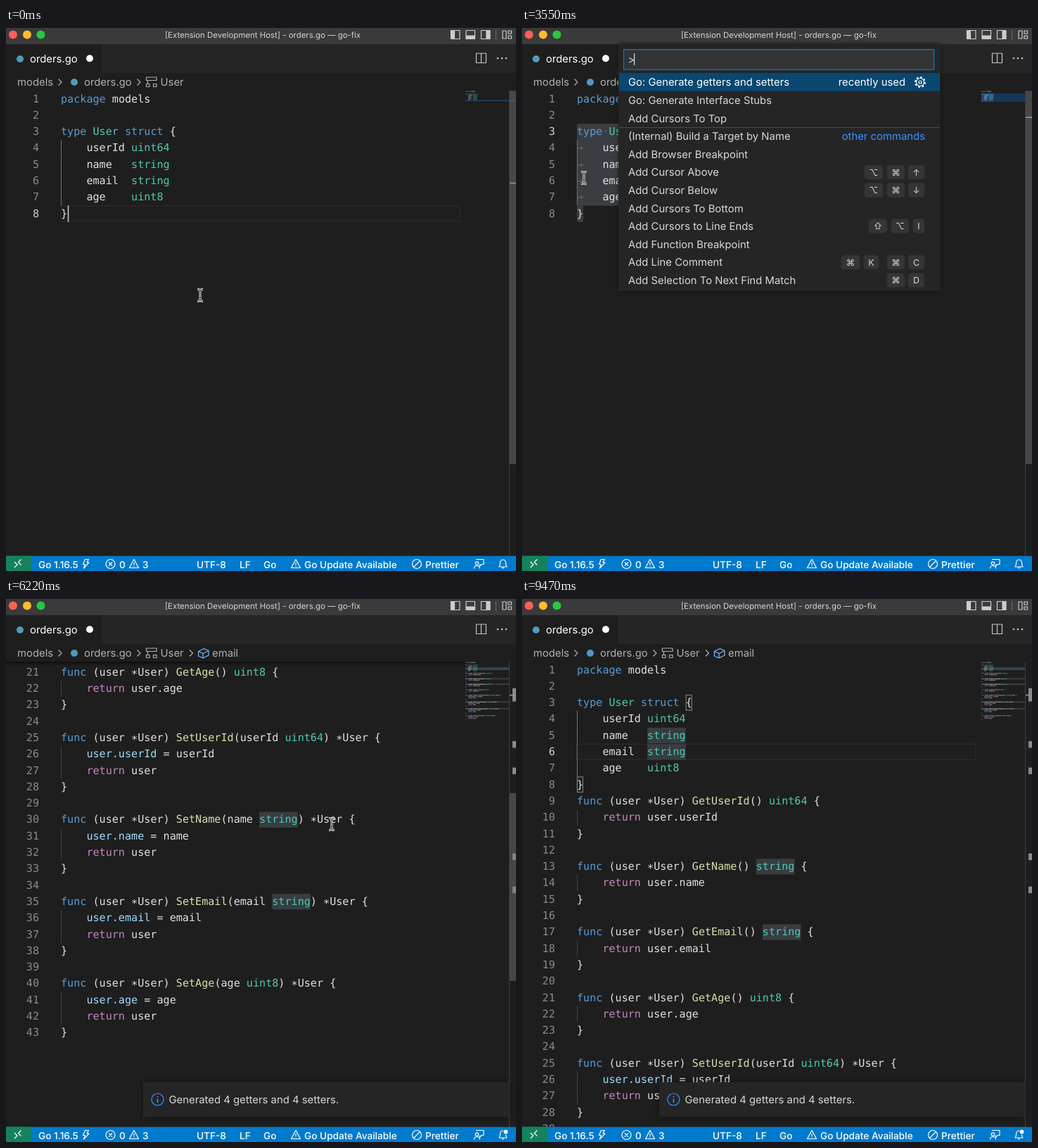
Animation, 725 px wide and 772 px high, one loop 9.57 s. Source, as an HTML page:

```html
<!DOCTYPE html>
<html lang="en">
<head>
<meta charset="utf-8">
<title>Generate getters and setters</title>
<style>
html, body { margin: 0; width: 100%; height: 100%; overflow: hidden; background: #1e1e1e; }
svg { display: block; }
text { font: 14.85px Inter, "Open Sans", sans-serif; white-space: pre; text-rendering: geometricPrecision; }
.code { font: 15.12px "DejaVu Sans Mono", monospace; }
.key { font: 12.5px Inter, "DejaVu Sans", sans-serif; }
#status text { font-size: 13.65px; font-weight: 500; fill: #fff; }
.icon { fill: none; stroke-width: 1.2; stroke-linejoin: round; }
</style>
</head>
<body>
<svg width="725" height="772" viewBox="0 0 725 772">
  <svg y="89" width="725" height="662" viewBox="0 89 725 662"><g id="editor"></g></svg>

  <rect width="725" height="23" fill="#3a3a3b"/>
  <circle cx="10" cy="9.5" r="6" fill="#ff5f57"/>
  <circle cx="30" cy="9.5" r="6" fill="#febc2e"/>
  <circle cx="49.5" cy="9.5" r="6" fill="#28c840"/>
  <text x="365" y="13.7" text-anchor="middle" fill="#d4d4d4" style="font-size:11.45px">[Extension Development Host] - orders.go — go-fix</text>
  <g class="icon" stroke="#ccc">
    <path d="M632.5 3.5h12.5v12h-12.5zM654 3.5h12.5v12h-12.5zM675.5 3.5h12.5v12h-12.5zM706 4h5v11h-5zM714 4h4.5v4h-4.5zM714 11h4.5v4h-4.5z"/>
    <path d="M633 4h4.5v11h-4.5zM654.5 11h11.5v4h-11.5zM683 4h4.5v11h-4.5z" fill="#ccc"/>
    <path d="M696.5 3v14" stroke="#666"/>
  </g>

  <rect y="23" width="725" height="41" fill="#252526"/>
  <rect y="23" width="136" height="42" fill="#1e1e1e"/>
  <rect y="64" width="725" height="25" fill="#1e1e1e"/>
  <circle cx="20" cy="44" r="5" fill="#519aba"/>
  <text x="34" y="49.2" fill="#fff">orders.go</text>
  <circle cx="119" cy="43.2" r="5" fill="#fff"/>
  <path class="icon" d="M668.5 36h14v13.5h-14zM675.5 36v13.5" stroke="#c5c5c5"/>
  <g fill="#c5c5c5"><circle cx="699" cy="43" r="1.3"/><circle cx="705" cy="43" r="1.3"/><circle cx="711" cy="43" r="1.3"/></g>
  <text x="16" y="82.3" fill="#b0b0b0">models</text>
  <circle cx="97" cy="77" r="5" fill="#519aba"/>
  <text x="111" y="82.3" fill="#b0b0b0">orders.go</text>
  <path class="icon" d="M74.5 72.5l4.500 4.500-4.500 4.500M186.5 72.5l4.500 4.500-4.500 4.500" stroke="#b0b0b0"/>

  <g id="status">
    <rect y="750.6" width="725" height="21.4" fill="#007acc"/>
    <rect y="750.6" width="37" height="21.4" fill="#16825d"/>
    <text x="46" y="767.8">Go 1.16.5</text>
    <text x="161" y="767.8">0</text>
    <text x="194" y="767.8">3</text>
    <text x="271" y="767.8">UTF-8</text>
    <text x="332" y="767.8">LF</text>
    <text x="366" y="767.8">Go</text>
    <text x="424" y="767.8">Go Update Available</text>
    <text x="596" y="767.8">Prettier</text>
    <g class="icon" stroke="#fff">
      <path d="M12 759l4 4-4 4M21.5 755.5l-4 4 4 4"/>
      <path d="M112.5 755.5h5l-2.5 4.5h3l-7.5 8 2-5.5h-3z"/>
      <circle cx="148.5" cy="762" r="6.5"/><path d="M146 759.5l5 5m0-5l-5 5"/>
      <path id="warn" d="M182 755.5l6.5 12h-13zM182 760v3.5m0 1v1.3"/>
      <use href="#warn" x="230"/>
      <circle cx="584" cy="762" r="6.5"/><path d="M579.5 766.5l9-9"/>
      <path d="M668 755.5h11v7h-3l-2.5 2.5v-2.5M665.5 768.5q0-4 4-4t4 4"/><circle cx="669.5" cy="761" r="2.2"/>
      <path d="M701 766q1.5-2 1.5-5 0-5 4-5t4 5q0 3 1.5 5zM705 767q1.5 2 3 0"/>
    </g>
  </g>
  <g id="over"></g>
</svg>

<script>
const LOOP = 9570, STEP = 148;
const TOP = 89.3, H = 661.5, LH = 23.3, LEFT = 78, CW = 9.1;
const editor = document.getElementById('editor'), over = document.getElementById('over');

const fields = [['userId', 'uint64'], ['name', 'string'], ['email', 'string'], ['age', 'uint8']];
const cap = s => s[0].toUpperCase() + s.slice(1);
const struct = ['package models', '', 'type User struct {',
  ...fields.map(([n, t]) => '    ' + n.padEnd(7) + t), '}'];
const getters = fields.flatMap(([n, t]) =>
  [`func (user *User) Get${cap(n)}() ${t} {`, `    return user.${n}`, '}', '']);
const setters = fields.flatMap(([n, t]) =>
  [`func (user *User) Set${cap(n)}(${n} ${t}) *User {`, `    user.${n} = ${n}`, '    return user', '}', '']);
const full = [...struct, ...getters, ...setters.slice(0, -1)];

const rect = (x, y, w, h, fill, more = '') =>
  `<rect x="${x}" y="${y}" width="${w}" height="${h}" fill="${fill}" ${more}/>`;
const text = (x, y, s, fill, more = '') => `<text x="${x}" y="${y}" fill="${fill}" ${more}>${s}</text>`;
const icon = (d, stroke, more = '') => `<path class="icon" d="${d}" stroke="${stroke}" ${more}/>`;
const clamp = (v, a, b) => Math.max(a, Math.min(b, v));
const lineY = i => TOP + (i - 1) * LH;
const colX = c => LEFT + c * CW;

// Linear interpolation through [time, ...values] keys
function track(keys, t) {
  const i = keys.findIndex(k => k[0] > t);
  if (i < 0) return keys[keys.length - 1].slice(1);
  if (!i) return keys[0].slice(1);
  const a = keys[i - 1], b = keys[i], u = (t - a[0]) / (b[0] - a[0]);
  return a.slice(1).map((v, j) => v + (b[j + 1] - v) * u);
}
const pointerKeys = [[296, 276, 380], [1332, 66, 157], [1480, 66, 150], [1628, 64, 148], [2072, 88, 213],
  [4292, 88, 213], [5032, 462, 217], [5180, 462, 230], [5328, 462, 257], [6216, 463, 320], [6660, 465, 340],
  [7252, 470, 380], [7696, 440, 712], [8140, 440, 712], [9176, 215, 755], [9324, 215, 800]];
const scrollKeys = [[5180, 0], [5328, 8], [5476, 80], [6216, 462.7], [6660, 490], [6808, 468], [7252, 297], [7600, 0]];

const splitter = /(\s+user\.\w+(?= =)|\b(?:package|type|struct|func|return|uint64|uint8|string)\b|[GS]et\w+|(?<=type )User|\*)/;
const paint = s =>
  /^(package|type|struct|func)$/.test(s) ? '#569cd6' :
  /^(uint64|uint8|string|User)$/.test(s) && s !== '*User' ? '#4ec9b0' :
  s === 'return' ? '#c586c0' :
  /^[GS]et/.test(s) ? '#dcdcaa' :
  /^ {4}user\./.test(s) ? '#9cdcfe' : '#e0e0e0';
const tokens = line => line.split(splitter).filter(Boolean).map(s => [s, paint(s)]);

// Caret place under the pointer while dragging
function spot([x, y]) {
  const line = clamp(Math.ceil((y + 3 - TOP) / LH), 1, 8);
  return [line, clamp(Math.round((x - LEFT) / CW), 0, struct[line - 1].length)];
}

function drawEditor(T) {
  const lines = T < 3996 ? struct : full, clicked = T >= 5032;
  const palette = T >= 2368 && T < 3848;
  const [line, col] = clicked ? [6, 17] : spot(track(pointerKeys, Math.min(T, 1480)));
  const selected = !clicked && (line < 8 || col < 1);
  const [scroll] = track(scrollKeys, T);
  const blink = Math.floor((T - 470) / 500) % 2 !== 0;
  const caretOn = !palette && (T < 1628 || blink);
  const total = (lines.length - 1) * LH + H, k = H / total;
  const ruler = i => TOP + (i - 1) * LH * k;
  let back = '', front = '', map = '', marks = '';

  if (!selected) back += rect(LEFT, lineY(line) + .5, 567, LH - 1.3, 'none', 'stroke="#2c2c2c" stroke-width="1.3"');

  lines.forEach((s, j) => {
    const i = j + 1, y = lineY(i), base = y + 16.2, my = TOP + j * 1.94;
    if (selected && i >= line && i <= 8) {
      const a = i === line ? col : 0, b = s.length + (i < 8 ? 1 : 0);
      back += rect(colX(a), y, (b - a) * CW, LH + .3, palette ? '#3a3d41' : '#264f78', 'rx="2"');
      const ws = s.replace(/^ {4}/, '→   ').replace(/ (?! *$)/g, (m, p) => p < 4 && s[0] === ' ' ? ' ' : '·')
        .replace(/[^→·]/g, ' ');
      front += text(colX(a), base, ws.slice(a), '#e3e4e2', 'class="code" opacity=".25"');
      map += rect(653, my, 62, 2, '#17385a') + rect(653, my, 17, 2, '#1f4a75');
    }
    const hit = s.indexOf('string');
    if (clicked && hit >= 0) {
      back += rect(colX(hit), y + .4, 6 * CW, LH - 1, '#373d41');
      map += rect(653, my, 62, 1.6, i === 6 ? '#2b5873' : '#3b4347');
      marks += rect(720, ruler(i), 5, LH * k, '#8b8b8b');
    }
    if (s.startsWith('    ')) front += rect(LEFT, y, 1, LH, i < 8 ? '#707070' : '#404040');
    let x = 0;
    front += `<text class="code" x="${LEFT}" y="${base}">` + tokens(s).map(([t, c]) => {
      for (const m of t.matchAll(/\S+/g))
        map += rect(653 + x + m.index, my + .4, m[0].length, 1.1, c, 'opacity=".5"');
      x += t.length;
      return `<tspan fill="${c}"${t === '*' ? ' baseline-shift="-2.5"' : ''}>${t}</tspan>`;
    }).join('') + '</text>';
    front += text(47, base, i, i === line ? '#d0d0d0' : '#8a8a8a', 'class="code" text-anchor="end"');
  });

  if (clicked || (T >= 148 && T < 444)) {
    const box = (i, c) => rect(colX(c) + .5, lineY(i) + .5, CW - 1, LH - 1.5, '#0064001a', 'stroke="#888"');
    back += box(3, 17) + box(8, 0);
    if (!clicked) marks += rect(720, ruler(3), 5, LH * k / 2, '#8b8b8b');
  }
  if (caretOn) front += rect(colX(col) + .6, lineY(line), 1.6, LH, '#c8c8c8');
  if (!selected && !clicked) map += rect(653, TOP + 13.3, 72, 1.3, '#1f4a70');

  const shade = scroll > 0
    ? [.5, .4, .3, .2, .1, .05].map((o, j) => rect(0, 89 + j, 652, 1, '#000', `opacity="${o}"`)).join('') : '';
  const slider = T < 7696 ? rect(716, TOP + scroll * k, 9, H * k, 'rgba(121,121,121,.45)') : '';
  editor.innerHTML = rect(0, 89, 725, 662, '#1e1e1e') +
    `<g transform="translate(0 ${-scroll})">${back}${front}</g>` + shade + map +
    rect(715, 89, 1, 662, '#3c3c3c') + marks + slider + rect(716, ruler(line) - .5, 9, 1.8, '#8f8f8f');
}

function crumbs(T) {
  const grey = '#b0b0b0';
  if (T >= 1776 && T < 5624) return text(198, 82.3, '...', grey);
  let out = icon('M199.5 70h14.5v4.5h-14.5zM199.5 79.5h4.5v4h-4.5zM209.5 79.5h4.5v4h-4.5zM201.5 74.5v5', grey) +
    text(219.5, 82.3, 'User', grey);
  if (T >= 5624) out += icon('M261 72.5l4.5 4.5-4.5 4.5', grey) +
    icon('M273.5 74.5l8-4 6.5 3v6.5l-8 4-6.5-3zM273.5 74.5l6.5 3 8-4M280 77.5v6.5', '#75beff') +
    text(293, 82.3, 'email', grey);
  return out;
}

function notice(T) {
  return rect(195, 687, 520, 49.5, '#252526', 'style="filter:drop-shadow(0 0 4px #0006)"') +
    '<circle class="icon" cx="215.5" cy="711.5" r="8.5" stroke="#3794ff"/>' +
    icon('M215.5 710.5v5.5M215.5 706.8v1.8', '#3794ff', 'style="stroke-width:1.6"') +
    text(231.5, 717.3, 'Generated 4 getters and 4 setters.', '#d8d8d8') +
    (T >= 7696 && T < 9000 ? icon('M698 702l8 8m0-8l-8 8', '#c5c5c5') : '') +
    '<circle cx="710.5" cy="757.5" r="3.5" fill="#fff" stroke="#007acc"/>';
}

// Label, then keys as [symbol, left, right]
const CMD = ['⌘', 519, 544], ALT = ['⌥', 487, 513];
const commands = [
  ['Go: Generate getters and setters'], ['Go: Generate Interface Stubs'], ['Add Cursors To Top'],
  ['(Internal) Build a Target by Name'], ['Add Browser Breakpoint'],
  ['Add Cursor Above', ALT, CMD, ['↑', 549, 572]],
  ['Add Cursor Below', ALT, CMD, ['↓', 549, 572]],
  ['Add Cursors To Bottom'],
  ['Add Cursors to Line Ends', ['⇧', 493, 519], ['⌥', 525, 550], ['I', 556, 572]],
  ['Add Function Breakpoint'],
  ['Add Line Comment', ['⌘', 454, 480], ['K', 486, 507], CMD, ['C', 549, 572]],
  ['Add Selection To Next Find Match', CMD, ['D', 549, 572]]];

function palette(T) {
  let out = rect(137, 22, 458, 352, '#252526', 'style="filter:drop-shadow(0 0 3px #0006)"') +
    rect(144.6, 30.6, 441, 28.5, '#333334', 'stroke="#007fd4" stroke-width="1.2"') +
    text(150.5, 50.3, '&gt;', '#d8d8d8') +
    (T < 2960 || T >= 3552 ? rect(159, 36, 1.2, 17, '#ddd') : '') +
    rect(138, 64, 456, 25.6, '#094771') + rect(138, 141, 456, 1, '#4a4a4d');
  commands.forEach(([label, ...keys], i) => {
    const y = 76.9 + i * 25.6;
    out += text(151, y + 5.4, label, i ? '#d8d8d8' : '#fff');
    for (const [s, a, b] of keys)
      out += rect(a, y - 10, b - a, 20, '#353536', 'rx="3.5" stroke="#2e2e2f"') +
        text((a + b) / 2, y + 4.6, s, '#d8d8d8', 'class="key" text-anchor="middle"');
  });
  out += text(545, 82.3, 'recently used', '#fff', 'text-anchor="end"') +
    text(573, 159.1, 'other commands', '#3794ff', 'text-anchor="end"') +
    '<g class="icon" stroke="#fff"><circle cx="566" cy="77" r="5.5"/><circle cx="566" cy="77" r="2"/>' +
    '<circle cx="566" cy="77" r="7" stroke-dasharray="2.75" style="stroke-width:2"/></g>';
  if (T < 3256) out += rect(582, 64, 12, 23, 'rgba(121,121,121,.4)');
  return out;
}

function pointer(T) {
  const [x, y] = track(pointerKeys, T);
  const beam = 'M-4-8.5Q0-8.5 0-6V6Q0 8.5-4 8.5M4-8.5Q0-8.5 0-6M0 6Q0 8.5 4 8.5M-2 3h4';
  const shape = y > 687
    ? '<path d="M0 0v16l4-3.5 2.5 6 2.8-1.2-2.5-5.8h5z" fill="#000" stroke="#fff"/>'
    : icon(beam, '#fff', 'style="stroke-width:2.8"') + icon(beam, '#111', 'style="stroke-width:1"');
  return `<g transform="translate(${x} ${y})">${shape}</g>`;
}

let last = -1;
function frame() {
  const n = Math.floor((performance.now() % LOOP + 6) / STEP);
  if (n !== last) {
    last = n;
    const T = n * STEP;
    drawEditor(T);
    over.innerHTML = crumbs(T) + (T >= 4144 ? notice(T) : '') +
      (T >= 2368 && T < 3848 ? palette(T) : '') + pointer(T);
  }
  requestAnimationFrame(frame);
}
frame();
</script>
</body>
</html>
```
